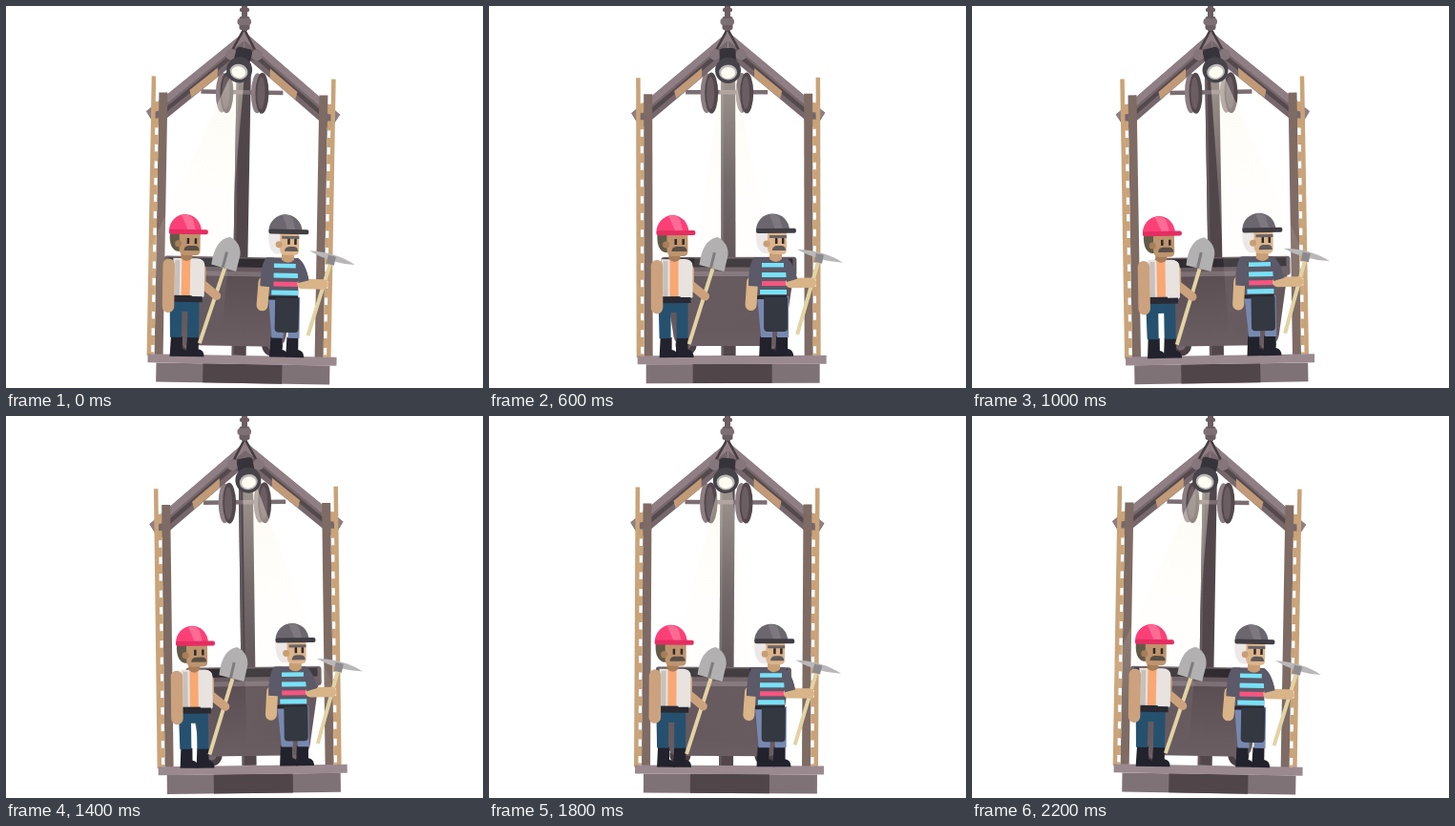
Write an HTML page that moves like this. It is 500x400 px and loops after 2.25 s.

```html
<!DOCTYPE html>
<html lang="en">
<head>
<meta charset="utf-8">
<title>Miners in a swaying lift</title>
<style>
html, body { margin: 0; width: 100%; height: 100%; overflow: hidden; background: #fff; }
svg { display: block; width: 500px; height: 400px; }
</style>
</head>
<body>
<svg viewBox="0 0 500 400">
  <defs>
    <linearGradient id="glow" gradientUnits="userSpaceOnUse" x1="0" y1="72" x2="0" y2="340">
      <stop offset="0" stop-color="#fff6e4" stop-opacity=".45"/>
      <stop offset=".4" stop-color="#fff8ea" stop-opacity=".2"/>
      <stop offset="1" stop-color="#fffaf0" stop-opacity="0"/>
    </linearGradient>
    <linearGradient id="steel" x1="0" y1="0" x2="0" y2="1">
      <stop offset="0" stop-color="#584c51"/>
      <stop offset="1" stop-color="#6b5e63"/>
    </linearGradient>
    <g id="wheel">
      <ellipse cx="228" cy="91" rx="6.5" ry="21" fill="#8b7d82"/>
      <ellipse cx="233" cy="91" rx="7" ry="21.5" fill="#53484c"/>
      <ellipse cx="232" cy="91" rx="4" ry="17" fill="#6b5e63"/>
    </g>
    <g id="post">
      <path d="M162 92h9v275h-9z" fill="#7d6b64"/>
      <path d="M154 75h4.5v293h-4.5z" fill="#c9a379"/>
      <path d="M160 101.500V366" stroke="#c9a379" stroke-width="4" stroke-dasharray="10 7.5"/>
    </g>
    <g id="roof">
      <path d="M250.500 27 149 112l8 13 5 1 88.500-74z" fill="#75676c"/>
      <path d="M250.500 27 149 112l4 6 97.500-82z" fill="#8f7f84"/>
      <path d="M164 112 242 46v6L166 116z" fill="#54494d"/>
      <path d="M194 89 223 65v10L196 97z" fill="#c19a77"/>
    </g>
    <g id="boots" fill="#22222c">
      <path d="M180 346h12v13q6 1 6 8H179z"/>
      <path d="M197 346h12v13q6 1 6 8H196z"/>
    </g>
  </defs>

  <g id="lift">
    <path d="M243 60h15v306h-15z" fill="#51474b"/>
    <path d="M243 60h2.500v306H243z" fill="#655a5e"/>
    <path d="M206 88h86v4.500h-86z" fill="#7b6e73"/>
    <use href="#wheel"/>
    <use href="#wheel" x="37"/>

    <g id="cart">
      <g fill="#4a4045"><circle cx="205" cy="355" r="11"/><circle cx="294" cy="355" r="11"/></g>
      <g fill="#75676c"><circle cx="205" cy="355" r="5"/><circle cx="294" cy="355" r="5"/></g>
      <path d="M180 268H320L308 346q-2 10-10 10H202q-8 0-10-10z" fill="url(#steel)"/>
      <rect x="179" y="263" width="142" height="20" rx="3" fill="#665a5f"/>
      <path d="M183 264.500H317v9H183z" fill="#302c30"/>
      <path d="M188 278H312v5H188z" fill="#7d7075"/>
    </g>

    <use href="#roof"/>
    <use href="#roof" transform="matrix(-1 0 0 1 501 0)"/>
    <use href="#post"/>
    <use href="#post" transform="matrix(-1 0 0 1 501 0)"/>
    <path d="M236 50 250 24l14 26" fill="none" stroke="#463d41" stroke-width="2.500"/>
    <path d="M237 45h27v12h-27z" fill="#63575b"/>
    <circle cx="237" cy="51" r="6" fill="#85767b"/>
    <circle cx="264" cy="51" r="6" fill="#85767b"/>

    <g id="lamp">
      <path d="M243 74h14L304 340H196z" fill="url(#glow)"/>
      <rect x="241.500" y="44" width="17" height="18" rx="4" fill="#37333a"/>
      <circle cx="250" cy="67.500" r="13.500" fill="#47434a"/>
      <ellipse cx="250" cy="69.500" rx="9.500" ry="8" fill="#bdb9b6"/>
      <ellipse cx="250" cy="70" rx="7.500" ry="6" fill="#fffdf2"/>
    </g>

    <path d="M164 375h182v20H164z" fill="#7f7277"/>
    <path d="M213 375h83v20h-83z" fill="#50464a"/>
    <path d="M155 366h198v9H155z" fill="#9a898f"/>

    <g id="digger" transform="translate(-1 1)">
      <use href="#boots"/>
      <path d="M178 306h31v41h-12v-27h-6v27h-12z" fill="#25516f"/>
      <path d="M181 264h25q7 0 7 7v34h-32z" fill="#e8e3df"/>
      <path d="M190 264h9v41h-9z" fill="#f9a873"/>
      <path d="M183 266h5v38h-5z" fill="#c6c1bf"/>
      <path d="M180 303h32v7h-32z" fill="#292a33"/>
      <path d="M176.500 271V315" stroke="#cba27d" stroke-width="12.500" stroke-linecap="round"/>
      <g transform="translate(-2 0)">
        <path d="M191 255h12v9q-6 6-12 0z" fill="#a87d59"/>
        <path d="M179 238h14v19h-6q-9-3-8-19z" fill="#625a48"/>
        <path d="M189 238h22v18q0 5-5 5h-11q-6 0-6-7z" fill="#bd946d"/>
        <circle cx="188" cy="249" r="3.500" fill="#a87d59"/>
        <path d="M194 256q0-5 6-5h5q5 0 5 5z" fill="#594e46"/>
        <path d="M197 243h2.500v6h-2.500zM205 243h2.500v6h-2.500z" fill="#30292a"/>
        <path d="M178 236a17 18 0 0 1 34 0z" fill="#fb4078"/>
        <path d="M191 219q8-2 12 4l3 12h-8z" fill="#ff6b94"/>
        <rect x="178" y="234" width="41" height="5" rx="2" fill="#e52d62"/>
      </g>
      <path d="M235 274 210 353" stroke="#e2d3a4" stroke-width="4"/>
      <path d="M221 270Q224 244 240 241q12 6 11 19l-4 17z" fill="#b2b0b1"/>
      <path d="M233 273 237 257" stroke="#7e7c7f" stroke-width="3"/>
      <path d="M211 275V290L227 303" fill="none" stroke="#cba27d" stroke-width="9" stroke-linecap="round" stroke-linejoin="round"/>
      <path d="M201 265h6q7 0 7 6v33h-13z" fill="#e8e3df"/>
    </g>

    <g id="picker" transform="translate(-.5 1)">
      <use href="#boots" x="104" y="-1"/>
      <path d="M281 303h33v43h-12v-15h-5v15h-12z" fill="#7789b1"/>
      <path d="M279 262h32q8 4 12 23l-11 3v16h-32z" fill="#5c5968"/>
      <path d="M286 268h23v4.500h-23zM284 278h28v5h-28zM284 296h28v5h-28z" fill="#78e1f7"/>
      <path d="M284 287h28v5h-28z" fill="#f6557f"/>
      <path d="M280 302h32v4h-32z" fill="#282931"/>
      <path d="M288 304h25v32q0 4-4 4h-17q-4 0-4-4z" fill="#343841"/>
      <path d="M276 288 274.500 312" stroke="#d9b489" stroke-width="12" stroke-linecap="round"/>
      <path d="M278 262h8v31l-14-1q0-23 6-30z" fill="#5c5968"/>
      <g transform="translate(-1 0)">
        <path d="M295 255h13v9q-6 6-13 0z" fill="#c79e75"/>
        <path d="M281 236h15v22h-7q-9-4-8-22z" fill="#ebe8e7"/>
        <path d="M293 236h20v18q0 5-5 5h-8q-7 0-7-7z" fill="#dcb58b"/>
        <circle cx="292" cy="248" r="3.500" fill="#c79e75"/>
        <path d="M298 255q0-5 6-5h3q5 0 5 5z" fill="#605a5c"/>
        <path d="M295 239h18v3h-18z" fill="#6a6467"/>
        <path d="M301 242h2.500v6h-2.500zM308 242h2.500v6h-2.500z" fill="#30292a"/>
        <path d="M281 234a17.500 17.500 0 0 1 35 0z" fill="#6c676e"/>
        <path d="M295 217q8-1 11 4l3 12h-8z" fill="#7d7880"/>
        <rect x="281" y="232" width="42" height="5" rx="2" fill="#403d44"/>
      </g>
      <path d="M346 264 323 343" stroke="#e2d3a4" stroke-width="4"/>
      <path d="M323 254q28 1 48 14-26-1-48-14z" fill="#b9b7b8"/>
      <path d="M343 258l8 2-2 9-8-2z" fill="#8c8a8d"/>
      <path d="M316 289H338" stroke="#d9b489" stroke-width="10.500" stroke-linecap="round"/>
      <path d="M310 263q9 4 13 22l-11 3z" fill="#5c5968"/>
    </g>
  </g>

  <g fill="#6a5e63">
    <path d="M247 0h6v26h-6z"/>
    <rect x="245" y="2" width="10" height="4" rx="1.500"/>
    <rect x="244.500" y="11" width="11" height="14" rx="2"/>
    <rect x="242.500" y="13" width="14.500" height="7" rx="3" fill="#7d7075"/>
  </g>
</svg>
<script>
const PERIOD = 2250, STEP = 50;
const [lift, cart, lamp] = ["lift", "cart", "lamp"].map(id => document.getElementById(id));

function draw(now) {
  const t = Math.floor(now % PERIOD / STEP) * STEP;
  const sway = Math.cos(2 * Math.PI * t / PERIOD);
  lift.setAttribute("transform", `rotate(${sway} 250 0)`);
  lamp.setAttribute("transform", `rotate(${14 * sway} 250 50)`);
  cart.setAttribute("transform", `translate(${-8.6 * sway})`);
}

const start = performance.now();
function loop() {
  draw(performance.now() - start);
  requestAnimationFrame(loop);
}
loop();
</script>
</body>
</html>
```
